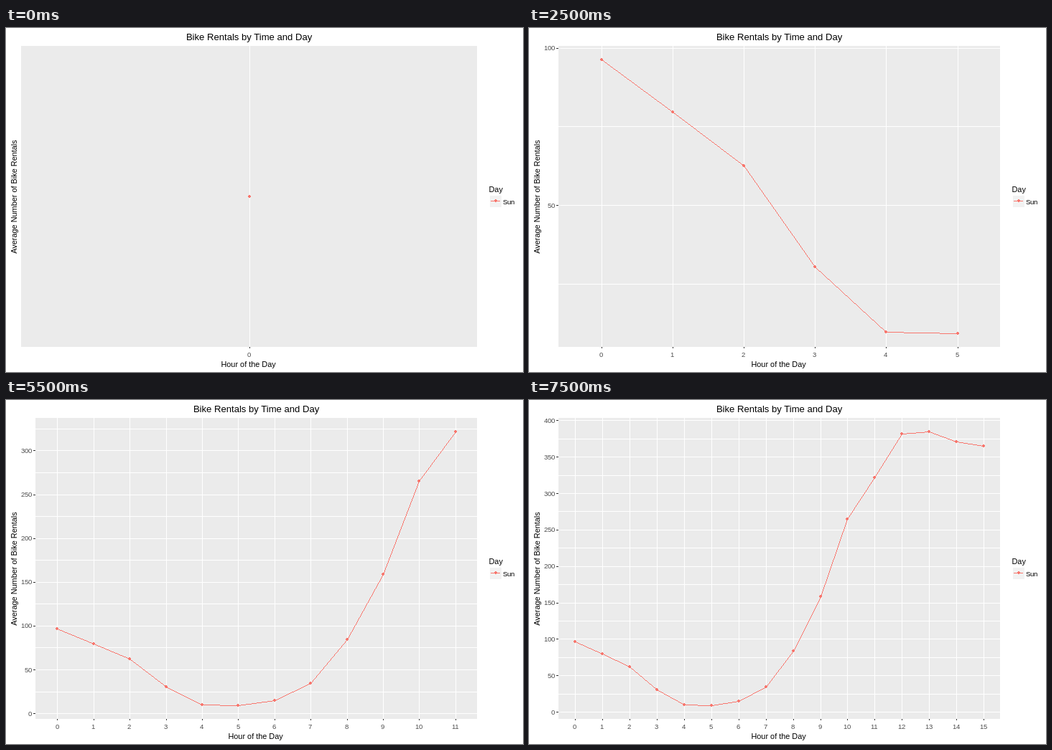
Write an HTML page that moves like this. It is 720x480 px and loops after 8 s.

```html
<!DOCTYPE html>
<html lang="en">
<head>
<meta charset="utf-8">
<title>Bike Rentals by Time and Day</title>
<style>
  html, body { margin: 0; width: 100%; height: 100%; overflow: hidden; background: #fff; }
  svg { display: block; font: 10.9px "Liberation Sans", Arial, sans-serif; }
  rect, path { shape-rendering: crispEdges; }
  .mid { text-anchor: middle; }
  .title { font-size: 13.1px; }
  .small, .tick { font-size: 9.6px; letter-spacing: -0.034em; }
  .tick { fill: #4d4d4d; }
  .data { fill: #f8766d; }
</style>
</head>
<body>
<svg width="720" height="480" viewBox="0 0 720 480">
  <g id="plot"></g>
  <text class="mid" transform="translate(15 235.5) rotate(-90)">Average Number of Bike Rentals</text>
  <text x="672.5" y="229">Day</text>
  <rect x="674" y="234" width="16" height="16" fill="#f2f2f2"/>
  <rect class="data" x="675" y="241" width="13" height="1"/>
  <path class="data" d="M681 239h2v1h1v2h-1v1h-2v-1h-1v-2h1z"/>
  <text class="small" x="692" y="246">Sun</text>
</svg>
<script>
const rentals = [96.3, 79.7, 62.6, 30.6, 9.8, 9.4, 15.1, 34.8,
                 84.1, 158.7, 265, 321.7, 381.3, 384.7, 370.7, 364.8];
const STEP = 500, TOP = 24.75, HEIGHT = 420, RIGHT = 656, BREAK = 50;
const plot = document.getElementById('plot');
const { round, floor, abs, min, max } = Math;

const rect = (x, y, w, h, fill) =>
  `<rect x="${round(x)}" y="${round(y)}" width="${round(w)}" height="${h}" fill="${fill}"/>`;
const text = (cls, x, y, s, extra = '') =>
  `<text class="${cls}" x="${x}" y="${y}" ${extra}>${s}</text>`;
const dot = ([x, y]) => `M${x - 1} ${y - 2}h2v1h1v2h-1v1h-2v-1h-1v-2h1z`;

// One-pixel line without smoothing
function segment([x0, y0], [x1, y1]) {
  const steps = max(abs(x1 - x0), abs(y1 - y0));
  let d = '';
  for (let i = 0; i < steps; i++) {
    const t = i / steps;
    d += `M${round(x0 + (x1 - x0) * t)} ${round(y0 + (y1 - y0) * t)}h1v1h-1z`;
  }
  return d;
}

// Multiples of gap, shifted by start, inside the range
function multiples(lo, hi, gap, start) {
  const list = [];
  for (let v = Math.ceil((lo - start) / gap) * gap + start; v <= hi; v += gap) list.push(v);
  return list;
}

function draw(n) {
  const data = rentals.slice(0, n);
  const low = min(...data), high = max(...data);
  const pad = n > 1 ? (high - low) * 0.05 : 1;
  const lo = low - pad, hi = high + pad;
  const major = multiples(lo, hi, BREAK, 0);
  const minor = major.length > 1 ? multiples(lo, hi, BREAK, BREAK / 2) : [];

  // The panel makes room for the widest axis label
  const digits = major.length ? String(major[major.length - 1]).length : 0;
  const left = digits ? 26.2 + 5 * digits : 21.2;
  const width = RIGHT - left, centre = (left + RIGHT) / 2;
  const bottom = round(TOP + HEIGHT);
  const xAt = i => left + width * (i + 0.6) / (n + 0.2);
  const yAt = v => TOP + HEIGHT * (hi - v) / (hi - lo);
  const points = data.map((v, i) => [round(xAt(i)), round(yAt(v))]);

  let out = rect(left, TOP, width, HEIGHT, '#ebebeb');
  for (const v of [...minor, ...major]) out += rect(left, yAt(v), width, 1, '#fff');
  for (const [x] of points) out += rect(x, TOP, 1, HEIGHT, '#fff');

  const lines = points.slice(1).map((p, i) => segment(points[i], p));
  for (const d of [...lines, ...points.map(dot)]) out += `<path class="data" d="${d}"/>`;

  for (const v of major) {
    const y = yAt(v);
    out += rect(left - 3, y, 3, 1, '#333');
    out += text('tick', round(left) - 5, floor(y + 4), v, 'text-anchor="end"');
  }
  points.forEach(([x], i) => {
    out += rect(x, bottom, 1, 2, '#333');
    out += text('tick', floor(xAt(i) - 2.35 * String(i).length), 459, i);
  });
  out += text('mid title', centre, 17, 'Bike Rentals by Time and Day');
  out += text('mid', centre - 1, 473, 'Hour of the Day');
  plot.innerHTML = out;
}

let shown = 0;
function tick() {
  const n = floor(performance.now() / STEP) % rentals.length + 1;
  if (n !== shown) draw(shown = n);
  requestAnimationFrame(tick);
}
tick();
</script>
</body>
</html>
```
